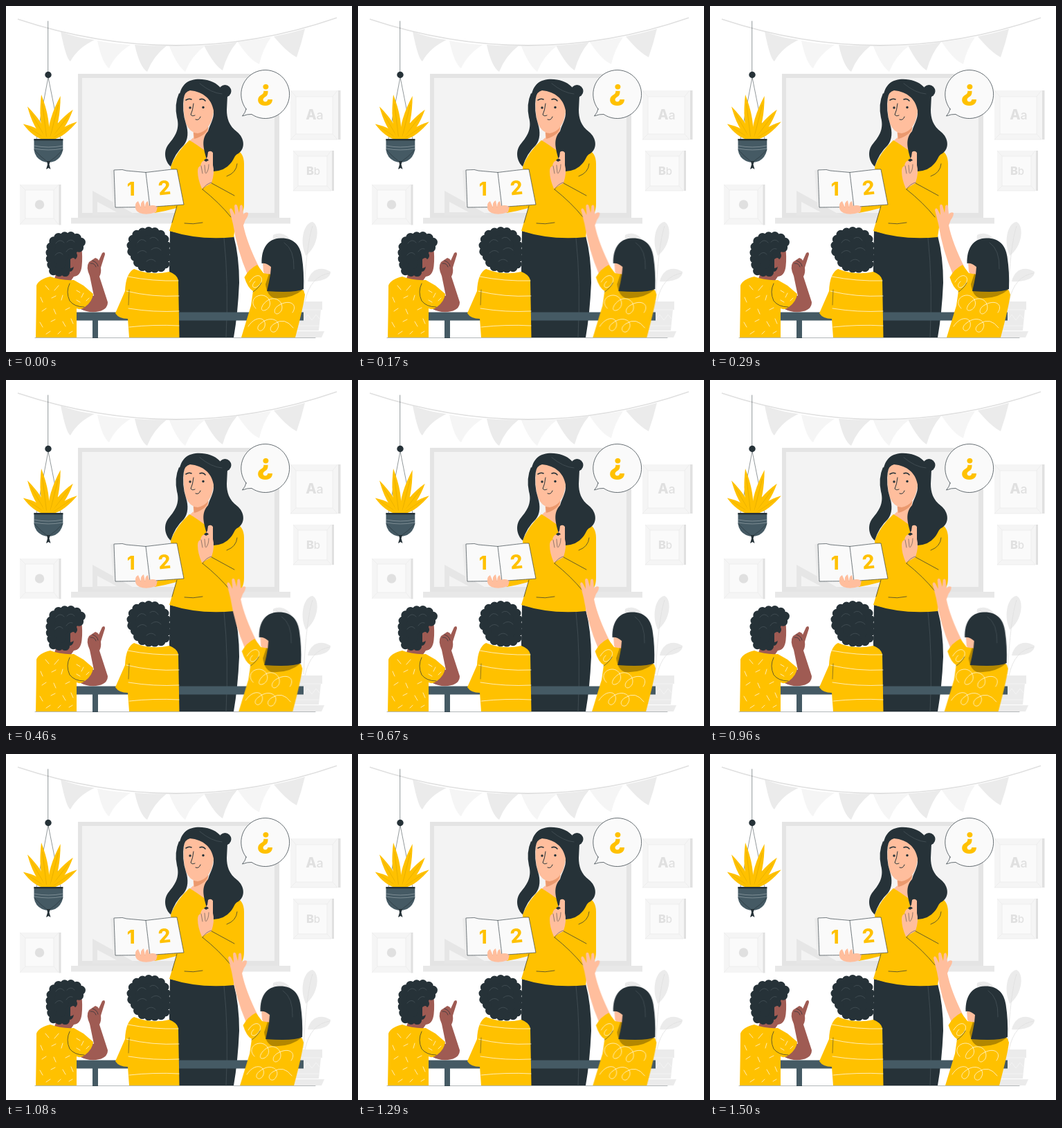
An HTML page that plays this animation: 500x500 px, repeating every 1540 ms.

```html
<!DOCTYPE html>
<html lang="en">
<head>
<meta charset="utf-8">
<title>Classroom</title>
<style>
  html, body { margin: 0; width: 100%; height: 100%; overflow: hidden; background: #fff; }
  svg { display: block; width: 100%; height: 100%; }
  text { font-family: Inter, "Open Sans", sans-serif; font-weight: 800; text-anchor: middle; }
  .y { fill: #ffc100; }
  .d { fill: #263238; }
  .s { fill: #455a64; }
  .g { fill: #e0e0e0; }
  .m { fill: #ebebeb; }
  .l { fill: #f5f5f5; }
  .w { fill: #fafafa; }
  .skin { fill: #ffbe9d; }
  .shade { fill: #eb996e; }
  .brown { fill: #9f5b53; }
  .ink { fill: none; stroke: #263238; stroke-width: .7; stroke-linecap: round; stroke-linejoin: round; }
  .chalk { fill: none; stroke: #fff; stroke-width: .7; stroke-linecap: round; }
  .edge { fill: none; stroke: #ebebeb; stroke-width: .8; }
  .curls { fill: #263238; stroke: #263238; stroke-width: 13; stroke-linecap: round; stroke-dasharray: 0 9; }
  .wisp { fill: none; stroke: #59656b; stroke-width: .5; stroke-linecap: round; }
</style>
</head>
<body>
<svg viewBox="0 0 500 500">
  <!-- bunting -->
  <path class="m" d="M79 37Q103 46 128 49Q104 60 93 80Q87 77 79 37ZM186 56Q209 58 232 57.500Q213 72 204 95Q193 88 186 56ZM286 57Q311 56 334 52Q320 68 313 93Q301 86 286 57ZM387 44Q412 39 432 33Q427 54 420 74Q406 67 387 44Z"/>
  <path class="l" d="M132 50Q156 55 180 56Q158 70 149 90Q139 83 132 50ZM236 58Q263 59 288 57Q268 72 259 95Q247 86 236 58ZM335 52Q360 49 383 45Q371 62 366 84Q352 78 335 52Z"/>
  <path d="M17 19Q250 96 478 17" fill="none" stroke="#e0e0e0" stroke-width="1.800"/>

  <!-- whiteboard -->
  <path d="M104 98H395V306H104Z" fill="#e4e4e4"/>
  <path d="M110 104H388V299H110Z" fill="#f3f3f3"/>
  <path d="M125 267V303H190ZM132 283V298H160Z" fill="#e6e6e6" fill-rule="evenodd"/>
  <path d="M94 306H411V314.500H94Z" fill="#e8e8e8"/>

  <!-- posters -->
  <path class="l" d="M20 258H79V316H20Z"/>
  <path class="g" d="M76.500 258H79.500V316.500H76.500Z"/>
  <path class="w" d="M28 266H69V307H28Z"/>
  <path class="edge" d="M20 258L28 266H69V307H28V266M76 258L69 266M69 307L76 316M28 307L20 316"/>
  <circle class="g" cx="48.500" cy="287" r="6.700"/>
  <path class="l" d="M411 122H483V193H411Z"/>
  <path class="g" d="M480 122H483.500V193H480Z"/>
  <path class="w" d="M419 131H472V185H419Z"/>
  <path class="edge" d="M411 122L419 131H472V185H419V131M479 122L472 131M472 185L479 193H411L419 185"/>
  <text class="g" x="446" y="164" font-size="20">A<tspan font-weight="500" font-size="18">a</tspan></text>
  <path class="l" d="M415 209H473V267H415Z"/>
  <path class="g" d="M471 209H474V267H471Z"/>
  <path class="w" d="M422 217H464V260H422Z"/>
  <path class="edge" d="M415 209L422 217H464V260H422V217M470 209L464 217M464 260L470 267H415L422 260"/>
  <text class="g" x="444" y="244" font-size="16.500">B<tspan font-weight="500" font-size="15">b</tspan></text>

  <!-- potted plant -->
  <path class="m" d="M430 352C425 328 435 312 443 312C454 317 452 347 433 361ZM436 398C440 380 455 375 469 384C469 396 449 399 436 398ZM412 356C392 346 384 340 386 331C398 324 416 334 416 354Z"/>
  <path class="edge" d="M443 318Q434 345 430 425M468 386Q440 390 432 427M390 332Q424 360 427 425" style="stroke:#e0e0e0"/>
  <path class="m" d="M407 427H457V439H455L452 469H412L409 439H407Z"/>
  <path class="edge" d="M409 439H456M418 454L424 446L430 454L436 446L442 454L448 446L453 452M418 462H453" style="stroke:#f5f5f5"/>
  <path class="m" d="M406 470H460L456 479H408Z"/>

  <!-- hanging plant -->
  <path class="ink" d="M60.700 22V96M61 103L44 193M61 103L79 193" style="stroke-width:.5"/>
  <circle class="d" cx="61" cy="99.500" r="4.700"/>
  <defs>
    <g id="blade">
      <path class="y" d="M-2 0C-8 -16 -6 -38 0 -60C6 -38 8 -16 2 0Z"/>
      <path d="M0 -4V-48" stroke="#d9a400" stroke-width=".5"/>
    </g>
  </defs>
  <use href="#blade" transform="translate(58 192) rotate(-57) scale(.9 .66)"/>
  <use href="#blade" transform="translate(58 192) rotate(-30) scale(.9)"/>
  <use href="#blade" transform="translate(59 193) rotate(-7) scale(1 1.090)"/>
  <use href="#blade" transform="translate(63 193) rotate(14) scale(1 1.080)"/>
  <use href="#blade" transform="translate(65 192) rotate(37) scale(1 .88)"/>
  <use href="#blade" transform="translate(66 192) rotate(56) scale(.8 .74)"/>
  <path class="s" d="M40.500 192H82.300V208Q80 219 71 224Q61 228 52 224Q42 219 40.500 208Z"/>
  <path class="d" d="M40.500 192H82.300V194.500H40.500ZM59 224H64L62.500 229L64.500 236L61.500 234L58 236L60 229Z"/>
  <path class="chalk" d="M41 202Q61 206 82 202M41 206Q61 210 82 206" style="stroke:#b5bec2;stroke-width:.5"/>
  <path class="ink" d="M41 208Q51 219 61 226Q72 219 82 208" style="stroke-width:.6"/>

  <!-- speech bubble -->
  <path class="ink" style="fill:#fafafa" d="M347 149A35 35 0 1 1 355 156.500Q349 156 341.500 159Q346 154 347 149Z"/>
  <text class="y" x="374.500" y="135.500" font-size="42">¿</text>

  <!-- teacher -->
  <path class="d" d="M237 325Q280 337 329 332Q337 362 337 400Q335 445 329 479H249Q236 425 236 380Z"/>
  <path class="wisp" d="M315 335Q322 400 318 479"/>
  <circle class="d" cx="316.500" cy="123" r="9"/>
  <path class="skin" d="M270 172L292 168V196Q297 215 283 211Q268 205 264 196L271 190Z"/>
  <path class="y" d="M265 194Q274 199 290 211L330 206Q344 211 344 228V286Q344 303 333 306L329 334Q280 339 236 325L246 292Q232 296 215 299L209 290L242 280L238 232Q246 211 265 194Z"/>
  <path class="skin" d="M258 126Q254 150 260 170Q265 182 276 184Q291 181 297 166L301 150Q301 130 284 124Q268 116 258 126Z"/>
  <path class="shade" d="M277 184Q287 182 293 174Q290 187 272 192L271 183Z"/>
  <path class="d" d="M257 133Q258 124 266 122C285 124 297 134 300 151C301 164 294 172 292 181C281 193 286 207 290 222Q291 235 300 239Q316 238 324 228C330 222 329 216 336 213C346 206 345 191 334 182C322 173 319 162 319 150L320 129L309 117C300 108 288 105 274 106C258 108 251 118 249 139Z"/>
  <path class="d" d="M250 126L257 131Q254 152 260 170Q266 189 257 201Q244 213 238 232C230 225 227 211 234 201C243 190 252 179 247 161Q243 142 250 126Z"/>
  <path class="wisp" d="M280 112Q297 126 312 127"/>
  <g class="ink">
    <path d="M260 136Q264 133 268 135M280 135Q285 133 288 137" style="stroke-width:1.600"/>
    <path d="M271 141Q270 151 267 157Q269 160 273 158M274 164Q279 166 281 160" style="stroke-width:1"/>
    <path d="M297 256L330 274M284 265Q308 284 325 305M319 246Q333 241 334 228M247 289L240 313M258 314Q270 316 284 313"/>
  </g>
  <circle class="d" cx="266" cy="147" r="1.700"/>
  <circle class="d" cx="285" cy="146.500" r="1.700"/>
  <path class="skin" d="M283 264Q277 250 277 239Q277 232 281 231Q282 224 287 223L291 218L292 211Q296 208 299 212L299 230Q302 240 297 256Z"/>
  <path class="d" d="M286 223Q290 218 293 223L289 225Z"/>
  <path class="ink" d="M282 231L284 242M287 230L288 241M293 229Q293 238 289 242M284 265Q289 257 297 255" style="stroke-width:.5"/>

  <!-- book -->
  <path class="m" d="M151 238L156 236L160 291L155 289Z"/>
  <path class="skin" d="M190 282Q185 284 187 291Q190 300 203 300L217 298L220 286L206 279Z"/>
  <path class="ink" style="fill:#fafafa;stroke-width:.6" d="M156 237L168 236.500L174 238L202 240.500L240 236H247L257 287L208 290.500L158 291ZM202 240.500L208 290.500" stroke-dasharray="2 .5"/>
  <path class="skin" d="M187 288Q187 284 191 282L195 291Q194 283 199 281L201 291Q201 283 205 282L207 289Q211 287 217 289L216 298Q203 303 193 299Q186 296 187 288Z"/>
  <text class="y" x="180.500" y="274" font-size="26.500">1</text>
  <text class="y" x="229" y="272.500" font-size="28" transform="rotate(-6 229 263)">2</text>

  <!-- desk rail -->
  <path class="s" d="M102 442.500H430V454.500H133V480H125V454.500H102Z"/>
  <path class="ink" d="M42 479.500H447" style="stroke-width:.5;opacity:.7"/>

  <!-- pointing child -->
  <path class="brown" d="M82 358L109 349Q111 362 109.500 376Q108 390 98 391L91 401L70 394Z"/>
  <path class="brown" d="M112 419L120 416L127 419L121 390Q115 377 120 370L129 364Q133 365 134 368L139 357Q143 354 143 359L137 378Q138 386 135 391L147 428Q147 440 130 442Q117 443 108 438Z"/>
  <path class="y" d="M64 391Q80 397 98 396L112 404L126 416Q125 427 114 435Q108 440 102 437V479H43Q44 427 44 404Q47 395 64 391Z"/>
  <path class="curls" d="M65 348Q69 333 84 333Q92 331 98 334Q109 336 109 345Q104 353 97 352Q98 362 93 367Q93 380 85 385L69 384Q63 369 64 355Z"/>
  <path class="brown" d="M93 366Q99 361 101 369Q100 378 93 379Z"/>
  <path class="wisp" d="M72 343Q78 335 84 342M88 341Q94 335 99 341M71 360Q77 353 82 359M87 355Q91 349 96 351"/>
  <path class="ink" d="M92 401Q86 413 92 426Q99 435 113 435M122 372Q128 371 130 377M125 368Q132 370 133 376"/>
  <path class="chalk" d="M57 404L62 410M76 404L70 411M50 421L53 428M66 422L72 419M82 418L80 425M52 441L58 437M69 438L72 445M86 439L92 436M49 457L53 464M65 456L71 453M82 456L86 463M94 452L97 459M58 474L64 470M75 474L79 470M91 473L96 470M102 411L107 414M112 415L109 421M102 425L107 428M116 426L120 422"/>

  <!-- middle child -->
  <path class="y" d="M185 380Q210 390 236 384Q247 388 249 396L250.500 479H178L176 452Q163 452 158 444L172 412Q173 386 185 380Z"/>
  <path class="curls" d="M181 346Q183 329 198 327Q211 323 223 330Q232 336 231 351Q233 366 229 376Q218 381 200 378Q190 374 187 363Q180 357 181 346Z"/>
  <path class="wisp" d="M190 342Q195 334 202 340M208 336Q215 331 220 339M190 357Q197 350 203 356M210 352Q218 346 224 353M203 369Q210 363 216 369"/>
  <path class="chalk" d="M176 391Q212 398 249 397M174 412Q212 421 250 419M177 437Q214 443 250 441M178 464Q214 460 250 462"/>
  <path class="ink" d="M178 410L177 432" style="stroke-width:.5"/>

  <!-- child raising a hand -->
  <g id="eager">
    <path class="skin" d="M349 388Q334 353 328 315L323 295Q324 290 327 294L331 302L330 289Q331 285 334 288L337 299L338 289Q341 285 342 290L343 301Q346 297 350 299Q350 304 346 309L343 317Q348 342 366 378Z"/>
    <path class="skin" d="M371 370L372 384Q374 390 384 389L389 370Z"/>
    <path class="y" d="M344.500 392Q351 380 363 374L372 386L383 388L430 411L432 417Q430 434 418 479H340L354 433L357 412Q349 407 344.500 392Z"/>
    <path d="M375 402L380 387L429 410Q412 424 387 422Q377 418 375 402Z" fill="#b38700"/>
    <path class="d" d="M369.500 372C369 350 378 336 397 335.500C415 335 425 345 427.500 362Q431 385 430 409Q418 415 377 412Q380 400 382 388L383 377Q376 371 369.500 372Z"/>
    <path class="wisp" d="M402 342Q417 352 416 380"/>
    <path class="chalk" d="M352 399C362 382 375 391 367 402C359 412 352 405 360 398M361 437C347 423 371 410 380 424C388 440 361 447 372 431C386 414 403 427 398 440C390 452 382 439 395 432C411 423 422 432 414 443M350 463C361 446 377 450 374 463C369 476 357 466 369 458C384 446 399 456 392 467C387 477 375 467 388 459Q403 449 415 465"/>
    <path class="ink" d="M357 413Q365 408 369 400" style="stroke-width:.6"/>
  </g>
</svg>
<script>
  const LOOP = 1540, STEPS = 37, SHAKE = 1500;
  const stops = [0, -1, 2, -4, 4, -4, 4, -4, 2, -1, 0];
  const shake = document.getElementById('eager').animate(
    stops.map(x => ({ transform: `translateX(${x}px)`, easing: 'ease' })),
    { duration: SHAKE, fill: 'both' });
  shake.pause();

  const start = performance.now();
  function draw() {
    // 24 poses a second, with start times rounded to 10 ms
    const time = (performance.now() - start) % LOOP;
    const step = Math.floor((time + 5) * STEPS / LOOP) % STEPS;
    shake.currentTime = step * SHAKE / (STEPS - 1);
    requestAnimationFrame(draw);
  }
  draw();
</script>
</body>
</html>
```
